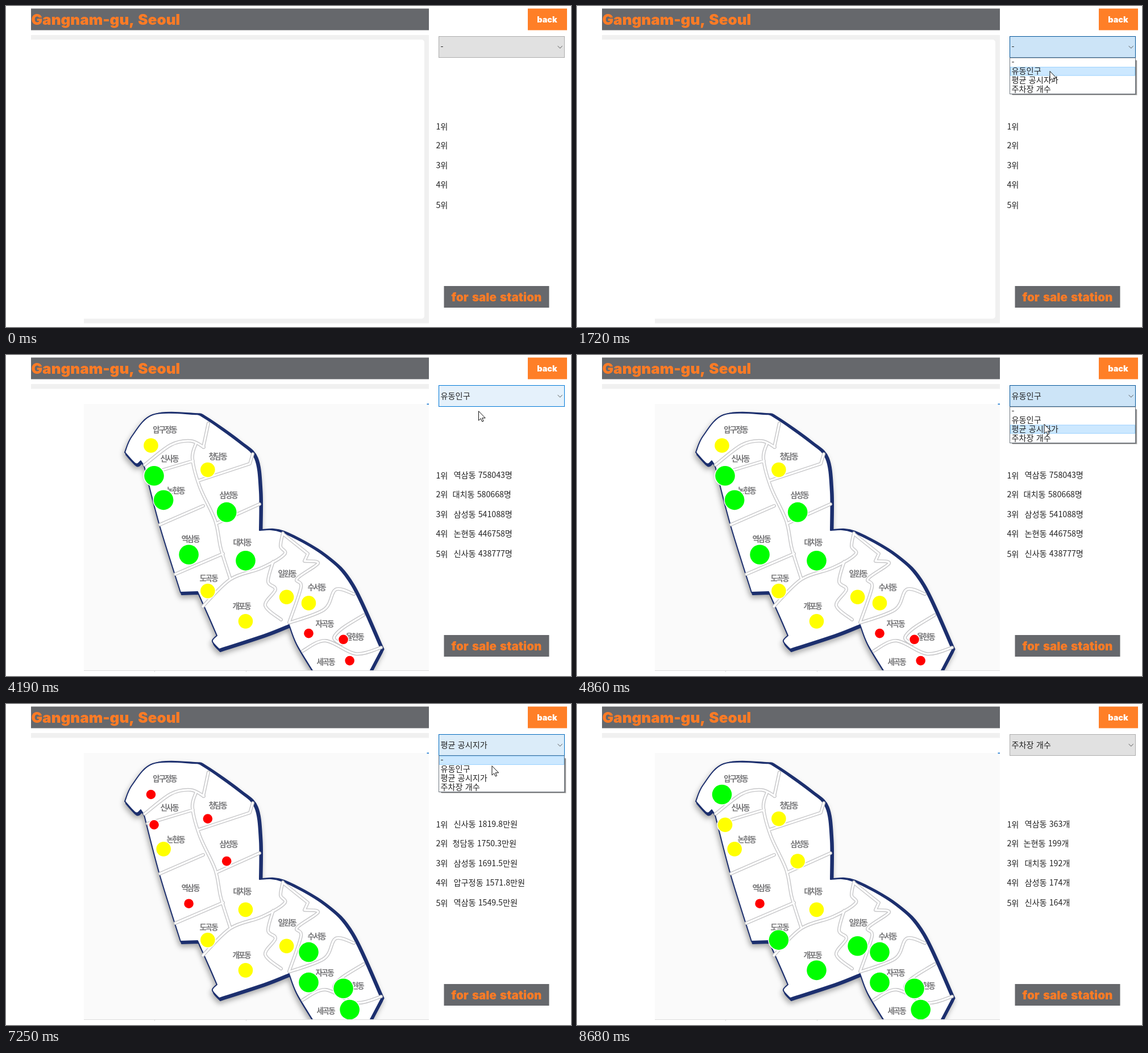
These frames come from a looping animation (994 px wide and 564 px high, 9950 ms). An HTML page:

```html
<!DOCTYPE html>
<html lang="ko">
<head>
<meta charset="utf-8">
<title>District map</title>
<style>
html, body { margin: 0; width: 100%; height: 100%; overflow: hidden; background: #fff; }
svg { display: block; width: 994px; height: 564px; }
text { font: 14.2px "Noto Sans CJK KR", "Noto Sans CJK", "Noto Sans", sans-serif; fill: #222; }
.head { font-family: Inter, "Open Sans", sans-serif; font-weight: 900; fill: #ff7b25; word-spacing: .1em; }
.area { font-size: 13.5px; font-weight: 700; fill: #777779; letter-spacing: -2.1px; text-anchor: middle; }
.land { filter: drop-shadow(-2px 5px 5px rgba(0, 0, 0, .33)); }
.dot { stroke: #fff; stroke-width: 3; paint-order: stroke; }
path { fill: none; stroke-linejoin: round; stroke-linecap: round; }
</style>
</head>
<body>
<svg id="stage" viewBox="0 0 994 564"></svg>
<script>
const LOOP = 9950;
const NAVY = '#1c2f6e';
const stage = document.getElementById('stage');

function add(parent, tag, attrs, text) {
  const el = document.createElementNS('http://www.w3.org/2000/svg', tag);
  for (const k in attrs) el.setAttribute(k, attrs[k]);
  if (text) el.textContent = text;
  parent.appendChild(el);
  return el;
}
const rect = (g, x, y, width, height, fill, more) =>
  add(g, 'rect', { x, y, width, height, fill, ...more });
const label = (g, x, y, text, more) => add(g, 'text', { x, y, ...more }, text);
const show = (el, on) => el.setAttribute('visibility', on ? 'visible' : 'hidden');
const mix = (a, b, k) => a.map((v, i) => v + (b[i] - v) * k);

// Smooth curve through "x,y x,y"; a bar after a point makes it a corner
function spline(list) {
  let d = '', end = [];
  for (const part of list.split('|')) {
    const p = [...end, ...part.trim().split(' ').map(s => s.split(',').map(Number))];
    d = d || 'M' + p[0];
    for (let i = 0; i < p.length - 1; i++) {
      const a = p[i], b = p[i + 1];
      const before = p[i - 1] || a, after = p[i + 2] || b;
      const c1 = a.map((v, n) => v + (b[n] - before[n]) / 6);
      const c2 = b.map((v, n) => v - (after[n] - a[n]) / 6);
      d += `C${c1} ${c2} ${b}`;
    }
    end = [p[p.length - 1]];
  }
  return d;
}

// Page
rect(stage, 44, 4.5, 700, 38, '#66686c');
label(stage, 44.5, 33, 'Gangnam-gu, Seoul', { class: 'head', style: 'font-size:26px' });
rect(stage, 918, 4.5, 69, 38, '#ff7f27');
label(stage, 952, 28.5, 'back', { class: 'head', style: 'font-size:14.4px;fill:#fff;text-anchor:middle' });
rect(stage, 770.5, 492, 185, 38, '#66686c');
label(stage, 863, 519, 'for sale station', { class: 'head', style: 'font-size:20.6px;text-anchor:middle' });
rect(stage, 44, 51, 700, 8.5, '#f0f0f0');

const empty = add(stage, 'g');
rect(empty, 137, 51, 607, 506.5, '#f0f0f0');
rect(empty, 40, 59, 696, 490.5, '#fff', { rx: 5 });
rect(empty, 40, 65, 97, 495, '#fff');

// Map: a white sheet over navy copies pushed right and down, which thicken those edges
const map = add(stage, 'g');
rect(map, 137, 86, 607, 468, '#fafafa');
rect(add(stage, 'clipPath', { id: 'frame' }), 137, 86, 607, 468);
const land = add(map, 'g', { 'clip-path': 'url(#frame)' });
const sheet = add(land, 'g', { class: 'land' });

const coast = spline('209,171 222,142 258,105 328,104 348,110 409,153 438,182 446,240 446,308|' +
  '485,311 560,353 608,405 660,518|640,556|540,556|511,508 498,474|455,491 375,517|363,503 371,493|' +
  '358,463 337,416|307,417|270,299 243,195|237,186|228,191 209,171') + 'Z';
for (const [x, y] of [[4.5, -1], [2, 4], [0, 0]]) {
  add(sheet, 'path', {
    d: coast, style: `fill:${x ? NAVY : '#fff'}`, stroke: NAVY, 'stroke-width': 2,
    transform: `translate(${x} ${y})`
  });
}

const roads = [
  '244,193 290,158 325,151 348,162',
  '356,120 347,162',
  '334,156 328,182 341,232 368,291 378,340 395,394',
  '249,210 329,186',
  '338,221 429,191|434,174',
  '271,298 347,265',
  '370,296 446,262',
  '298,385 382,349',
  '346,442 395,394 450,374 490,350 483,336 487,313',
  '470,363 461,398 474,412 456,440 484,465',
  '487,314 531,349|525,362|549,366 512,393 519,408 498,470',
  '500,470 560,447 580,412 612,420',
  '629,457 592,480 577,497 590,508',
  '522,520 562,502 615,525 660,514'
].map(spline).join('');
add(land, 'path', { d: roads, stroke: '#c6c6c8', 'stroke-width': 6 });
add(land, 'path', { d: roads, stroke: '#fff', 'stroke-width': 3.2 });

// Name, centre of the label, cell of the dot on a regular grid
const areas = [
  ['압구정동', 280, 131, 0, 0], ['청담동', 373, 178, 18, 4], ['신사동', 288, 182, 1, 5],
  ['논현동', 299, 238, 4, 9], ['삼성동', 392, 246, 24, 11], ['역삼동', 325, 323, 12, 18],
  ['대치동', 416, 329, 30, 19], ['도곡동', 357, 392, 18, 24], ['개포동', 415, 441, 30, 29],
  ['일원동', 495, 384, 43, 25], ['수서동', 547, 408, 50, 26], ['자곡동', 561, 472, 50, 31],
  ['율현동', 614, 495, 61, 32], ['세곡동', 563, 539, 63, 35.5]
];
for (const [name, x, y] of areas) label(land, x - 1, y + 5, name, { class: 'area' });
const dots = areas.map(([, , , col, row]) =>
  add(land, 'circle', { class: 'dot', cx: 255 + col * 5.55, cy: 159 + row * 10.65 }));
rect(map, 137, 554, 607, 1, '#dcdcdc');
for (const x of [261, 422]) rect(map, x, 554, 1, 3, '#dcdcdc');
rect(map, 740.5, 85.5, 3.5, 1.7, '#1a78d0');

// Ranking
const ranks = [211.5, 245, 280, 314, 349.5].map((y, i) => {
  label(stage, 756.5, y + 5, i + 1 + '위');
  return label(stage, i === 1 ? 785.5 : 787.5, y + 4.5, '');
});

const options = ['-', '유동인구', '평균 공시지가', '주차장 개수'];
const DOT = { g: ['#00ff00', 17.3], y: ['#ffff00', 12.8], r: ['#ff0000', 8.3] };
const views = [
  { dots: 'yygggggyyyyrrr',
    rank: ['역삼동 758043명', '대치동 580668명', '삼성동 541088명', '논현동 446758명', '신사동 438777명'] },
  { dots: 'rrryrryyyygggg',
    rank: ['신사동 1819.8만원', '청담동 1750.3만원', '삼성동 1691.5만원', '압구정동 1571.8만원', '역삼동 1549.5만원'] },
  { dots: 'gyyyyryggggggg',
    rank: ['역삼동 363개', '논현동 199개', '대치동 192개', '삼성동 174개', '신사동 164개'] }
];

// Select box and its list
const ROW = 15.7, LIST_TOP = 91;
const box = rect(stage, 761.5, 53.5, 221, 37);
const value = label(stage, 764.5, 77, '-');
add(stage, 'path', { d: 'M971 70.5l3.700 3.700 3.700-3.700', stroke: '#555' });

const list = add(stage, 'g');
rect(list, 766, 96, 219.5, 61, '#000', { opacity: .2 });
rect(list, 765, 95, 219.5, 61, '#000', { opacity: .4 });
rect(list, 761.5, LIST_TOP, 221, 63.5, '#fff', { stroke: '#6e7680' });
const mark = rect(list, 762.5, 0, 219, ROW - 1, '#cce8ff', { stroke: '#99d1ff' });
options.forEach((o, i) => label(list, 764.5, LIST_TOP + 12.5 + i * ROW, o));

const cursor = add(stage, 'path', {
  d: 'M0 0V16L3.700 12.600 6.200 18 8.600 17 6.200 11.700H11.300Z',
  style: 'fill:#fff', stroke: '#111'
});

// Each round opens the list, picks the next option and then shows its data
const rounds = [
  { open: 1210, pick: 1990, view: 2200 },
  { open: 4500, pick: 5200, view: 5710 },
  { open: 6780, pick: 8160, view: 8330 }
];
const GREY = [225, 225, 225, 173, 173, 173];
const HOVER = [229, 241, 251, 0, 120, 215];
const OPEN = [204, 228, 247, 0, 84, 153];
const FADE = 250;
const tones = [
  [0, GREY], [700, HOVER], [1210, OPEN], [2300, GREY], [3890, HOVER],
  [4450, OPEN], [5200, HOVER], [6780, mix(HOVER, OPEN, .4)], [8380, GREY]
];
const trips = [
  [[170, 838, 328], [850, 851, 72], [1150, 846, 72], [1300, 845, 76], [1720, 832, 115], [2200, 832, 113]],
  [[3890, 838, 138], [4400, 827, 72], [4760, 822, 122], [4970, 822, 122], [5050, 833, 126],
   [6340, 833, 126], [6370, 848, 118], [6620, 898, 64], [6780, 893, 66], [7250, 855, 109],
   [7690, 851, 148], [8010, 840, 141], [8330, 840, 141]]
];

function cursorAt(t) {
  const trip = trips.find(p => t >= p[0][0] && t < p[p.length - 1][0]);
  if (!trip) return null;
  const i = trip.findIndex(s => s[0] > t);
  const a = trip[i - 1], b = trip[i];
  return mix(a, b, (t - a[0]) / (b[0] - a[0])).slice(1);
}

function toneAt(t) {
  const i = tones.filter(s => s[0] <= t).length - 1;
  const from = tones[Math.max(0, i - 1)][1];
  return mix(from, tones[i][1], Math.min(1, (t - tones[i][0]) / FADE)).map(Math.round);
}

// The highlight trails the pointer a little
function markedRow(t, chosen) {
  const at = cursorAt(t - 80);
  const row = at ? Math.floor((at[1] + 1 - LIST_TOP) / ROW) : -1;
  return row < 0 ? chosen : Math.min(row, options.length - 1);
}

let current = -1;
function setView(n) {
  if (n === current) return;
  current = n;
  show(empty, !n);
  show(map, n);
  const view = views[n - 1];
  ranks.forEach((el, i) => { el.textContent = view ? view.rank[i] : ''; });
  if (!view) return;
  dots.forEach((el, i) => {
    const [fill, r] = DOT[view.dots[i]];
    el.setAttribute('fill', fill);
    el.setAttribute('r', r);
  });
}

function draw(t) {
  const passed = key => rounds.filter(r => r[key] <= t).length;
  const chosen = passed('pick');
  setView(passed('view'));
  value.textContent = options[chosen];
  show(list, passed('open') > chosen);
  mark.setAttribute('y', LIST_TOP + .7 + markedRow(t, chosen) * ROW);

  const tone = toneAt(t);
  box.setAttribute('fill', `rgb(${tone.slice(0, 3)})`);
  box.setAttribute('stroke', `rgb(${tone.slice(3)})`);

  const at = cursorAt(t);
  show(cursor, at);
  if (at) cursor.setAttribute('transform', `translate(${at})`);
}

const start = performance.now();
function tick() {
  draw((performance.now() - start) % LOOP);
  requestAnimationFrame(tick);
}
tick();
</script>
</body>
</html>
```
